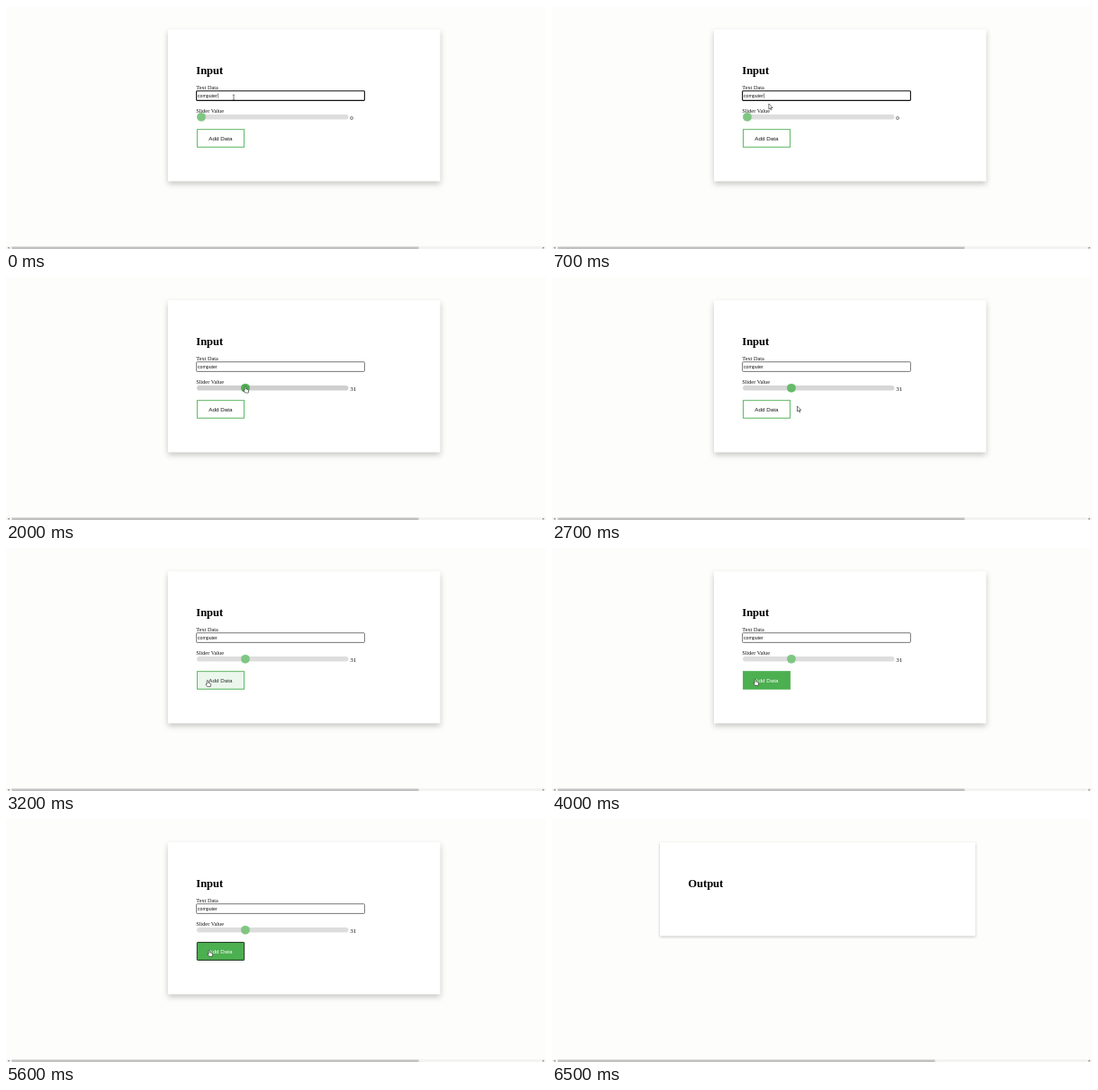
An HTML page that plays this animation: 600 px wide and 271 px high, repeating every 8000 ms.

```html
<!DOCTYPE html>
<html lang="en">
<head>
<meta charset="utf-8">
<title>Data form</title>
<style>
  html, body { margin: 0; width: 100%; height: 100%; overflow: hidden; background: #fdfefc; }
  svg { display: block; width: 600px; height: 271px; }
  text { font: 6.25px "Liberation Serif", serif; fill: #111; }
  .title { font-size: 12.5px; font-weight: bold; fill: #000; }
  .sans { font-family: "Liberation Sans", sans-serif; }
  .card { fill: #fefffe; filter: drop-shadow(0 1.6px 1.6px rgba(0,0,0,.24)); }
  .raised { filter: drop-shadow(0 3px 3.2px rgba(0,0,0,.22)); }
  .cursor { fill: #fff; stroke: #222; stroke-width: .6; stroke-linejoin: round; }
</style>
</head>
<body>
<svg viewBox="0 0 600 271">
  <g id="inputPage">
    <rect class="card raised" x="180" y="26" width="302.5" height="169.5"/>
    <text class="title" x="211.3" y="76">Input</text>
    <text x="211.3" y="92.5">Text Data</text>
    <rect id="field" x="211.6" y="94.7" width="186.8" height="10.7" rx=".8" fill="#fff"/>
    <text class="sans" x="213" y="101.6" style="font-size:5.2px">computer</text>
    <path id="caret" d="M235.6 97.3v5.4" stroke="#111" stroke-width=".5"/>
    <text x="211.3" y="118.8">Slider Value</text>
    <g id="slider">
      <rect x="212" y="121" width="168.5" height="5.6" rx="2.8" fill="#cfcfcf"/>
      <circle id="knob" cy="123.8" r="4.9" fill="#4caf50"/>
    </g>
    <text id="value" x="382.2" y="126.5" style="font-size:7px"></text>
    <rect id="button" x="212.4" y="137.7" width="52.2" height="19.6" stroke="#4caf50" stroke-width=".9"/>
    <rect id="ring" x="212.3" y="137.6" width="52.4" height="19.8" rx="1" fill="none"
      stroke="#111" stroke-width="1" stroke-dasharray="1.6 .4"/>
    <text id="label" class="sans" x="225.3" y="149.7">Add Data</text>
    <g id="pointer">
      <path id="beam" d="M-1.2-3Q0-3 0-2.4Q0-3 1.2-3M0-2.4V2.4M-1.2 3Q0 3 0 2.4Q0 3 1.2 3"
        fill="none" stroke="#222" stroke-width=".6"/>
      <path id="arrow" class="cursor" d="M0 0v6l1.4-1.3 1 2.2.9-.4-1-2.1h2z"/>
      <path id="hand" class="cursor"
        d="M0 0q.8 0 .8.9v2l2.2.6q.8.3.7 1.2l-.4 2.4h-3.6l-1.8-2.6q.2-.9 1.3-.1V.9Q-.8 0 0 0z"/>
    </g>
  </g>
  <g id="outputPage">
    <rect class="card" x="120" y="26" width="350.5" height="104.5"/>
    <text class="title" x="151.3" y="76">Output</text>
  </g>
  <rect y="268" width="600" height="3" fill="#f3f4f2"/>
  <rect id="thumb" x="6.5" y="268.5" height="2.5" fill="#c1c1c1"/>
  <path d="M2 269.8l1.6-1v2zM598 269.8l-1.6-1v2z" fill="#555"/>
</svg>
<script>
  const LOOP = 8000, STEP = 100, SUBMIT = 6200;
  const el = Object.fromEntries([...document.querySelectorAll('[id]')].map(e => [e.id, e]));

  // time, x, y of the mouse hotspot
  const path = [
    [0, 253, 102], [500, 253, 102], [1000, 218.5, 122], [1400, 217.5, 122], [2000, 266, 122],
    [2500, 266, 122], [2900, 279, 166], [3100, 226, 160], [3200, 224, 147.5],
    [3400, 226, 146.2], [LOOP, 226, 146.2]
  ];

  const clamp = v => Math.min(1, Math.max(0, v));
  const smooth = v => v * v * (3 - 2 * v);
  const progress = (t, start, length) => smooth(clamp((t - start) / length));
  const mix = (a, b, k) => `rgb(${a.map((v, i) => Math.round(v + (b[i] - v) * k))})`;
  const show = (e, on) => e.style.display = on ? '' : 'none';

  function mouseAt(t) {
    const i = path.findIndex(p => p[0] > t);
    const [t0, x0, y0] = path[i - 1], [t1, x1, y1] = path[i];
    const k = smooth((t - t0) / (t1 - t0));
    return [x0 + (x1 - x0) * k, y0 + (y1 - y0) * k];
  }

  function draw(t) {
    const done = t >= SUBMIT;
    show(el.inputPage, !done);
    show(el.outputPage, done);
    el.thumb.setAttribute('width', done ? 419 : 452);

    const focused = t < 1500;
    el.field.setAttribute('stroke', focused ? '#111' : '#555');
    el.field.setAttribute('stroke-width', focused ? 1.1 : .8);
    show(el.caret, focused);

    const value = Math.round(31 * progress(t, 1400, 600));
    el.value.textContent = value;
    el.knob.setAttribute('cx', 217 + value * 1.58);
    el.slider.setAttribute('opacity', .7 + .3 * (progress(t, 1000, 200) - progress(t, 2600, 200)));

    const hover = progress(t, 3120, 400);
    el.button.setAttribute('fill', mix([254, 255, 254], [76, 175, 80], hover));
    el.label.style.fill = mix([17, 17, 17], [255, 255, 255], hover);
    show(el.ring, t >= 4200);

    const [x, y] = mouseAt(t);
    const beam = y < 106;
    const hand = (y > 118 && y < 128) || (y > 137 && y < 158 && x < 265);
    el.pointer.setAttribute('transform', `translate(${x} ${y})`);
    show(el.beam, beam);
    show(el.hand, hand);
    show(el.arrow, !beam && !hand);
  }

  const begin = performance.now();
  function tick() {
    const t = (performance.now() - begin) % LOOP;
    draw(Math.floor(t / STEP) * STEP);
    requestAnimationFrame(tick);
  }
  tick();
</script>
</body>
</html>
```
